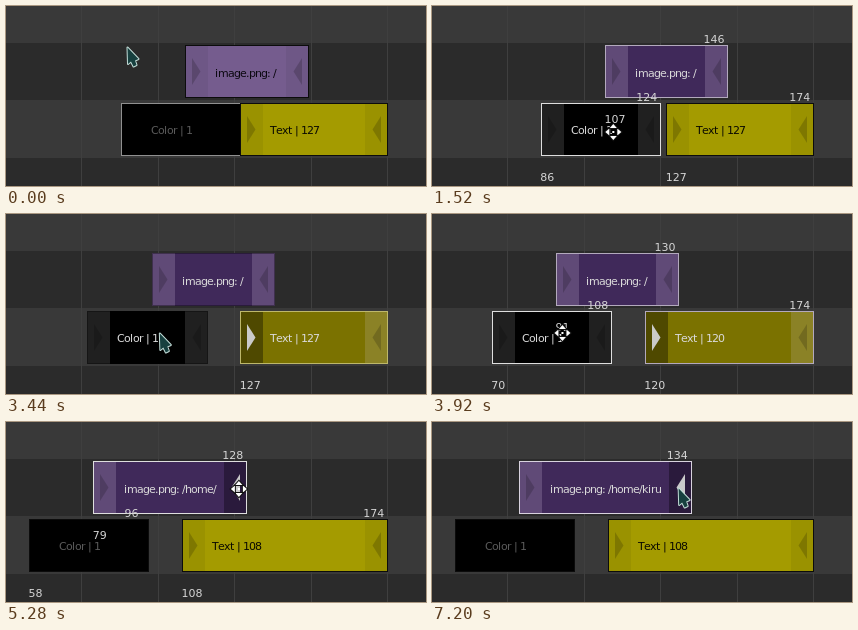
Write an HTML page with a canvas that moves like this. It is 420 by 180 pixels and loops after 7.44 s.

```html
<!DOCTYPE html>
<html lang="en">
<head>
<meta charset="utf-8">
<title>Moving strips and handles</title>
<style>
  html, body { margin: 0; width: 100%; height: 100%; overflow: hidden; background: #2b2b2b; }
  canvas { display: block; width: 420px; height: 180px; }
</style>
</head>
<body>
<canvas id="stage" width="420" height="180"></canvas>
<script>
const ctx = document.getElementById('stage').getContext('2d');
const LOOP = 7440, STEP = 80, GLIDE = 560;
const PX_PER_FRAME = 3.06, ROW_PITCH = 57.5, STRIP_HEIGHT = 53, HANDLE = 23;
const HOME = { x: 121, y: 41 };

const frameX = frame => 234.25 + (frame - 127) * PX_PER_FRAME;
const rowTop = row => 39.3 + row * ROW_PITCH;

// Free pointer moves and strip drags; every one glides for the same time
const boxSelect = { start: 160, dx: 67, dy: 85 };
const travels = [
  boxSelect,
  { start: 1920, dx: 79, dy: -2 },
  { start: 2880, dx: -80, dy: -5 },
  { start: 4320, dx: 108, dy: -52 },
  { start: 5840, dx: -6, dy: -1 }
];
const drags = [
  { grab: 1040, start: 1360, release: 1920, frames: -11 },
  { grab: 3600, start: 3680, release: 4240, frames: -19 },
  { grab: 4960, start: 4960, release: 5840, frames: 16 }
];
const clicks = { textHandle: 2720, color: 3520, imageHandle: 4960 };

const palettes = {
  image: { base: '#755c8e', chosen: '#40295a', grip: '#604a77', dark: '#2a1a3c', edge: '#d8d2de', text: '#0b0810' },
  color: { base: '#000', chosen: '#000', grip: '#202020', dark: '#000', edge: '#909090', text: '#5a5a5a' },
  text: { base: '#a49b00', chosen: '#7b7200', grip: '#8b8226', dark: '#4f4900', edge: '#bdb76b', text: '#0b0b00' }
};

function progress(t, start) {
  const k = Math.min(1, Math.max(0, (t - start) / GLIDE));
  return k * k * (3 - 2 * k);
}

function pointerAt(t) {
  let { x, y } = HOME;
  for (const { start, dx, dy } of travels) {
    x += dx * progress(t, start);
    y += dy * progress(t, start);
  }
  for (const { start, frames } of drags) x += frames * PX_PER_FRAME * progress(t, start);
  return [x, y];
}

function polygon(points, fill, stroke, width = 1) {
  ctx.beginPath();
  points.forEach(([x, y]) => ctx.lineTo(x, y));
  ctx.closePath();
  if (stroke) {
    ctx.strokeStyle = stroke;
    ctx.lineWidth = width;
    ctx.stroke();
  }
  ctx.fillStyle = fill;
  ctx.fill();
}

function rect(x, y, w, h, fill) {
  ctx.fillStyle = fill;
  ctx.fillRect(x, y, w, h);
}

function frameRect(x, y, w, h, stroke) {
  ctx.lineWidth = 1;
  ctx.strokeStyle = stroke;
  ctx.strokeRect(x + .5, y + .5, w, h);
}

// Whole-pixel advances, cut before the first letter that passes the limit
function stripText(text, x, y, limit, fill) {
  ctx.fillStyle = fill;
  for (const letter of text) {
    const advance = Math.floor(ctx.measureText(letter).width);
    if (x + advance > limit) return;
    ctx.fillText(letter, x, y);
    x += advance;
  }
}

function outlineColor(s, palette, dragging) {
  if (s.active) return dragging ? '#dedede' : palette.edge;
  if (!s.selected) return '#0c0c0c';
  return dragging ? '#b3a9bd' : 'rgba(0,0,0,.35)';
}

function drawStrip(s, dragging) {
  const palette = palettes[s.kind];
  const startX = frameX(s.start), endX = frameX(s.end + 1);
  const left = Math.round(startX), right = Math.round(endX) + 1;
  const top = Math.round(rowTop(s.row)), middle = top + STRIP_HEIGHT / 2;
  rect(left, top, right - left, STRIP_HEIGHT, s.selected ? palette.chosen : palette.base);

  const drawGrip = (side, x, edge, dir) => {
    const held = s.handle === side;
    const selectedShade = held ? palette.dark : palette.grip;
    rect(x, top, HANDLE, STRIP_HEIGHT, s.selected ? selectedShade : 'rgba(0,0,0,.06)');
    const base = edge + dir * 7, tip = edge + dir * 15.5;
    polygon([[base, middle - 13.5], [tip, middle], [base, middle + 13.5]], held ? '#cacaca' : 'rgba(0,0,0,.18)');
  };
  drawGrip('left', left, left, 1);
  drawGrip('right', right - HANDLE, right, -1);

  frameRect(left, top, right - left - 1, STRIP_HEIGHT - 1, outlineColor(s, palette, dragging));
  stripText(s.name, Math.round(startX + 30.15), Math.round(rowTop(s.row) + 31.5), endX - 28,
    s.selected ? '#dadada' : palette.text);
}

function drawLabels(s, dragging) {
  const top = Math.round(rowTop(s.row));
  ctx.fillStyle = '#d4d4d4';
  if (dragging || s.handle === 'left') ctx.fillText(s.start, frameX(s.start) - .5, top + 78);
  if (dragging || s.handle === 'right') ctx.fillText(s.end, frameX(s.end + 1) - 24, top - 2);
}

function drawArrow(x, y) {
  const shape = [[.5, .5], [1, 17], [4, 14.5], [6.5, 19.5], [9.5, 18], [8, 13.5], [11.5, 12]];
  ctx.lineJoin = 'round';
  polygon(shape.map(([dx, dy]) => [x + dx, y + dy]), '#17403f', '#c3ddd8', 2);
  ctx.lineJoin = 'miter';
}

function drawMoveCross(x, y) {
  for (let turn = 0; turn < 4; turn++) {
    const dx = Math.cos(turn * Math.PI / 2), dy = Math.sin(turn * Math.PI / 2);
    const at = (along, across) => [x + dx * along - dy * across, y + dy * along + dx * across];
    polygon([at(8, 0), at(4, 3.5), at(4, -3.5)], '#fff', '#111', 2);
  }
  rect(x - 1, y - 1, 2, 2, '#fff');
}

function drawBoxSelect(x, y) {
  x = Math.round(x);
  y = Math.round(y);
  const box = [HOME.x, HOME.y, x - HOME.x, y - HOME.y];
  rect(...box, 'rgba(255,255,255,.06)');
  frameRect(...box, '#444');
  ctx.setLineDash([4, 4]);
  frameRect(...box, '#ccc');
  ctx.setLineDash([]);
  for (const [reach, half, shade] of [[7, 1, '#111'], [6, 0, '#fff']]) {
    rect(x - reach, y - half, 2 * reach + 1, 2 * half + 1, shade);
    rect(x - half, y - reach, 2 * half + 1, 2 * reach + 1, shade);
  }
}

function drawBackground() {
  rect(0, 0, 420, 180, '#2b2b2b');
  rect(0, 0, 420, 37, '#393939');
  rect(0, 94, 420, 58, '#393939');
  for (let frame = 75; frame <= 175; frame += 25) rect(Math.round(frameX(frame)), 0, 1, 180, '#3f3f3f');
}

function draw(t) {
  const [first, second, stretch] = drags.map(d => Math.round(d.frames * progress(t, d.start)));
  const shift = first + second;
  const textStart = 127 + second;
  const dragging = drags.some(d => t >= d.grab && t < d.release);
  const boxEnd = boxSelect.start + GLIDE;
  const imageHeld = t >= clicks.imageHandle;
  const pairSelected = t >= boxEnd && !imageHeld;
  const textSelected = t >= clicks.textHandle && !imageHeld;
  const textActive = textSelected && t < clicks.color;

  const strips = [
    { kind: 'image', name: 'image.png: /home/kiru/', row: 0, start: 109 + shift, end: 148 + shift + stretch,
      selected: pairSelected || imageHeld, active: imageHeld, handle: imageHeld && 'right' },
    { kind: 'color', name: 'Color | 1', row: 1, start: 88 + shift, end: 126 + shift,
      selected: pairSelected, active: !textActive && !imageHeld },
    { kind: 'text', name: 'Text | ' + textStart, row: 1, start: textStart, end: 174,
      selected: textSelected, active: textActive, handle: textSelected && 'left' }
  ];

  ctx.font = '11px "DejaVu Sans", sans-serif';
  drawBackground();
  strips.forEach(s => drawStrip(s, dragging));
  strips.forEach(s => drawLabels(s, dragging));

  const pointer = pointerAt(t);
  if (t > boxSelect.start && t < boxEnd) drawBoxSelect(...pointer);
  else if (dragging) drawMoveCross(...pointer);
  else drawArrow(...pointer);
}

function tick() {
  const t = performance.now() % LOOP;
  draw(Math.floor(t / STEP) * STEP);
  requestAnimationFrame(tick);
}
tick();
</script>
</body>
</html>
```
